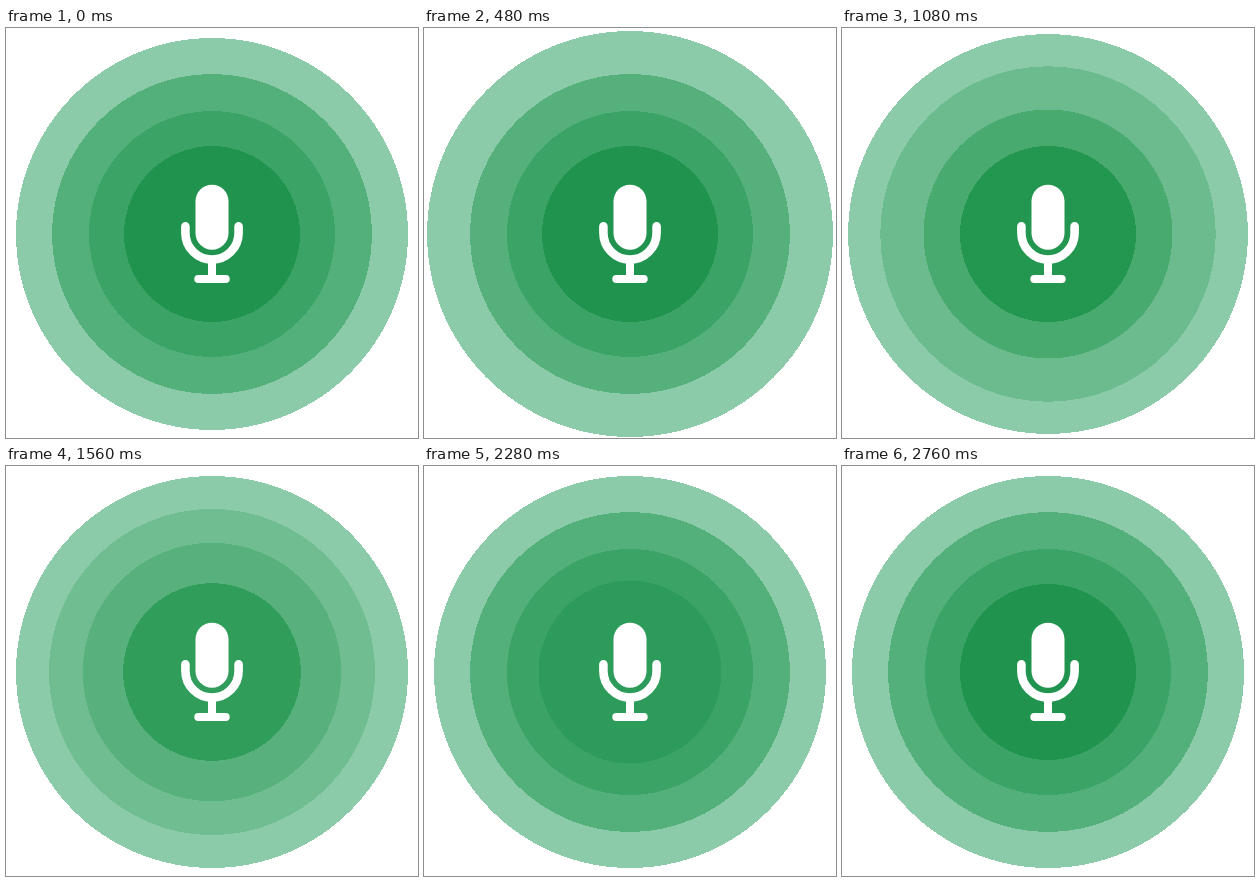
An HTML page that plays this animation: 412 by 410 pixels, repeating every 4770 ms.

```html
<!DOCTYPE html>
<html lang="en">
<head>
<meta charset="utf-8">
<title>Microphone pulse</title>
<style>
html, body { margin: 0; width: 100%; height: 100%; overflow: hidden; background: #fff; }
svg { display: block; width: 100%; height: 100%; }
</style>
</head>
<body>
<svg viewBox="0 0 412 410" preserveAspectRatio="xMidYMid meet">
  <g id="rings" shape-rendering="crispEdges"></g>
  <g fill="none" stroke="#fff" stroke-linecap="round">
    <rect x="189.5" y="156.7" width="33" height="65" rx="16.5" fill="#fff" stroke="none"/>
    <path d="M179.4 198.2V205a26.6 26.6 0 0 0 53.2 0V198.2" stroke-width="8.6"/>
    <path d="M206 234V250" stroke-width="8" stroke-linecap="butt"/>
    <path d="M192.3 251H219.7" stroke-width="8"/>
  </g>
</svg>
<script>
const LOOP = 4770, STEP = 60;
const DEEP = "#1a9249";

// Outermost first; each ring swells a little after the one around it.
// start and span time the swell, fade is when the ring begins to pale.
const rings = [
  { r: 196, grow: 9, start: 0, span: 1400, fade: LOOP, fill: "#8ccbaa", alpha: 1 },
  { r: 160, grow: 8, start: 460, span: 1400, fade: 460, fill: DEEP, alpha: 0.485 },
  { r: 123, grow: 6.2, start: 840, span: 1480, fade: 1090, fill: DEEP, alpha: 0.43 },
  { r: 88, grow: 4.5, start: 1360, span: 1400, fade: 1280, fill: DEEP, alpha: 0.8 }
];

const group = document.getElementById("rings");
for (const ring of rings) {
  ring.el = document.createElementNS("http://www.w3.org/2000/svg", "circle");
  ring.el.setAttribute("cx", 206);
  ring.el.setAttribute("cy", 206);
  ring.el.setAttribute("fill", ring.fill);
  group.appendChild(ring.el);
}

const clamp = x => Math.min(1, Math.max(0, x));
const swell = p => (1 - Math.cos(2 * Math.PI * p)) / 2;

// Quick fade to half strength, then a return as the swell ends.
function strength(sinceFade, p) {
  const out = Math.sin(Math.PI / 2 * clamp(sinceFade / 980));
  const back = clamp((p - 0.82) / 0.15);
  return 1 - 0.5 * out * (1 - back);
}

function draw(ms) {
  const t = Math.floor((ms % LOOP) / STEP) * STEP;
  for (const ring of rings) {
    const p = clamp((t - ring.start) / ring.span);
    ring.el.setAttribute("r", ring.r + ring.grow * swell(p));
    ring.el.setAttribute("fill-opacity", ring.alpha * strength(t - ring.fade, p));
  }
}

const begin = performance.now();
function tick() {
  draw(performance.now() - begin);
  requestAnimationFrame(tick);
}
tick();
</script>
</body>
</html>
```
